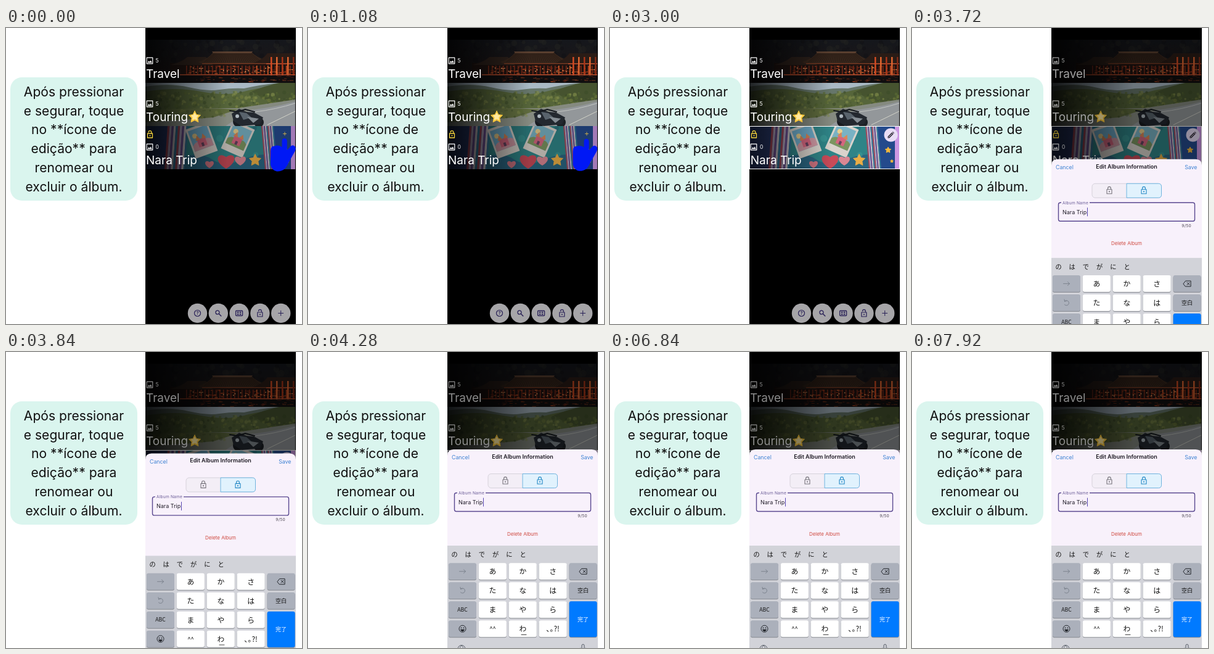
These frames come from a looping animation (480 px wide and 480 px high, 8000 ms). An HTML page:

```html
<!DOCTYPE html>
<html lang="pt">
<head>
<meta charset="utf-8">
<title>Editar álbum</title>
<style>
html, body { margin: 0; width: 100%; height: 100%; overflow: hidden; background: #fff; }
svg { display: block; width: 100vw; height: 100vh; }
text { font-family: Inter, 'Noto Sans CJK JP', 'Noto Sans CJK', sans-serif; }
.jp text { font-family: 'Noto Sans CJK JP', 'Noto Sans CJK', sans-serif; }
</style>
</head>
<body>
<svg id="stage" viewBox="0 0 480 480" xmlns="http://www.w3.org/2000/svg"></svg>
<script>
const LOOP = 8000;
const stage = document.getElementById('stage');

let seed = 7;
const rnd = () => (seed = (seed * 16807) % 2147483647) / 2147483647;
const pick = list => list[Math.floor(rnd() * list.length)];
const times = (n, fn) => Array.from({ length: n }, (_, i) => fn(i)).join('');

const rect = (x, y, w, h, fill, extra = '') =>
  `<rect x="${x}" y="${y}" width="${w}" height="${h}" fill="${fill}" ${extra}/>`;
const path = (d, fill, extra = '') => `<path d="${d}" fill="${fill}" ${extra}/>`;
const line = (d, color, width = 1, extra = '') =>
  path(d, 'none', `stroke="${color}" stroke-width="${width}" stroke-linecap="round" stroke-linejoin="round" ${extra}`);
const circle = (x, y, r, fill, extra = '') => `<circle cx="${x}" cy="${y}" r="${r}" fill="${fill}" ${extra}/>`;
const text = (s, x, y, size, fill, extra = '') =>
  `<text x="${x}" y="${y}" font-size="${size}" fill="${fill}" ${extra}>${s}</text>`;
const mid = 'text-anchor="middle"';
const at = (x, y, body, extra = '') => `<g transform="translate(${x} ${y}) ${extra}">${body}</g>`;

function star(x, y, r, fill, ratio = 0.5) {
  const pts = times(10, i => {
    const a = i * Math.PI / 5 - Math.PI / 2, q = i % 2 ? r * ratio : r;
    return `${(x + q * Math.cos(a)).toFixed(1)},${(y + q * Math.sin(a)).toFixed(1)} `;
  });
  return `<polygon points="${pts}" fill="${fill}" stroke="${fill}" stroke-width="1" stroke-linejoin="round"/>`;
}

const heart = (x, y, s, fill) =>
  at(x, y, path('M0 9C-17 -1-9-12 0-5C9-12 17-1 0 9Z', fill), `scale(${s})`);

// Icons are centred on their own origin.
const lock = (color, open, width = 1.1) =>
  line(`M-4-1.500H4V5.500H-4ZM-2.400-1.500V-3.500a2.400 2.400 0 0 1 4.800 0${open ? 'V-1.500' : 'V-1.500'}`, color, width,
    open ? 'stroke-dasharray="36.200 4 9"' : '') + circle(0, 2, 1.1, color);
const openLock = (color, width = 1.2) =>
  line('M-4-1.500H4V5.500H-4ZM-2.400-3.500a2.400 2.400 0 0 1 4.800 0V-1.500', color, width) + circle(0, 2, 1.1, color);
const imageIcon = line('M-4.800-4.800H4.800V4.800H-4.800Z', '#fff', 1.2) + path('M-3.6 3.2L-1.5.2 0 2 1.6-.6 3.8 3.2Z', '#fff');
const pencil = path('M-5 5V2.500L1.700-4.200 4.200-1.700-2.500 5ZM2.400-4.900L3.200-5.500 5.500-3.200 4.900-2.400Z', '#2c2733') +
  line('M-3.600 3.600L2-2', '#e9ddf6', 1);

function shrine() {
  const reds = ['#d04a22', '#a83518', '#7e2814', '#e0652f'];
  return rect(0, 0, 243, 70, 'url(#dusk)') +
    times(70, () => circle(rnd() * 243, rnd() * 34, 2 + rnd() * 4, pick(['#191b1c', '#222120', '#121316']), 'opacity=".6"')) +
    rect(40, 38, 203, 19, '#1f1310') +
    path('M40 41Q60 36 68 28H98L110 41Z', '#2d211b') +
    path('M86 36Q104 30 110 20H172Q180 28 196 34L190 39H90Z', '#37261c') +
    path('M108 19H174L172 22H110Z', '#5b4030') +
    path('M172 39Q190 33 198 22H243V40Z', '#2a1c16') +
    times(28, i => line(`M${112 + i * 2.2} 22L${96 + i * 3.4} 36`, '#231812', .7)) +
    rect(92, 38, 104, 1.4, '#7c3c24') + rect(196, 38, 47, 2, '#a5472a') +
    times(30, i => rect(66 + i * 6, 42, 1.5, 15, i > 18 ? pick(reds) : '#7a2a18')) +
    times(70, () => rect(66 + rnd() * 176, 42 + rnd() * 13, 2 + rnd() * 4, 1.2, pick(reds), 'opacity=".7"')) +
    times(24, () => circle(76 + rnd() * 165, 45 + rnd() * 8, .9, '#f0a468')) +
    times(5, i => rect(203 + i * 9, 28, 2.5, 40, pick(reds))) +
    rect(56, 56, 187, 1.6, '#b04a2a') +
    rect(0, 58, 243, 12, '#100e0f') +
    times(50, () => rect(80 + rnd() * 160, 59 + rnd() * 10, 2 + rnd() * 6, .9, pick(reds), 'opacity=".5"'));
}

function road() {
  const greens = ['#6f7a3c', '#3d4d2a', '#596a34', '#808a4a', '#4b5a30'];
  return rect(0, 0, 243, 70, '#a9b9c4') +
    path('M0 6Q40 0 70 7T120 11T160 9Q200 0 243-2V70H0Z', '#66766a') +
    path('M0 14Q50 6 90 14T160 14T243 2V70H0Z', '#56653a') +
    path('M172 14Q207-1 243-3V32L200 30Z', '#46532f') +
    times(230, () => {
      const x = rnd() * 243;
      return circle(x, 15 + rnd() * 28, .8 + rnd() * 2.4, pick(greens), 'opacity=".65"');
    }) +
    path('M0 50Q80 40 150 41L243 27V70H0Z', '#858a80') +
    path('M130 70L170 44Q214 39 243 30V70Z', '#93979a') +
    line('M178 47Q212 43 243 33', '#c3c6c2', 1) + line('M198 68L243 46', '#d2d2c8', 1) +
    path('M0 46Q70 39 150 43L110 56 0 64Z', '#5f6b3e') +
    times(60, () => circle(rnd() * 130, 44 + rnd() * 14, 1 + rnd() * 2, pick(greens), 'opacity=".5"')) +
    circle(150, 63, 8, '#181b20') + circle(184, 64, 8, '#1c2025') +
    path('M140 50L152 42 164 47 176 48 191 56 186 67 156 70 143 62Z', '#23282f') +
    path('M152 47L164 49 172 56 159 60Z', '#59636c') + path('M165 55L184 58 175 65Z', '#858d94') +
    line('M137 45L149 47 162 43 177 47', '#15191e', 2) + circle(149, 54, 3, '#aeb8be');
}

const polaroid = (x, y, turn, sky, hill) => at(x, y,
  rect(-19, -25, 38, 50, '#d9d3cc') + rect(-16, -21, 32, 35, sky) +
  circle(-8, -10, 4, '#e8cf8d') + path('M-16 14V5Q-8-4 0 4Q8-5 16 3V14Z', hill) +
  rect(-7, -3, 14, 13, '#d5667f') + path('M-9-2L-5-10-1-2ZM1-2L5-10 9-2Z', '#dc8655') + rect(-2, 4, 4, 6, '#65435f'),
  `rotate(${turn})`);

function pages(x, width, lean) {
  const colors = ['#a9485a', '#b9a9c4', '#6f4f93', '#d0c4cb', '#35779a'];
  const step = width / 10;
  return times(10, i => path(`M${x + i * step} 0h${step}l${lean} 70h${-step}Z`, colors[i % 5]));
}

function scrapbook() {
  return rect(0, 0, 243, 70, '#2b7f86') + rect(0, 0, 40, 70, '#2b3c70') +
    pages(36, 34, -5) +
    path('M70 0H190L198 70H64Z', '#2f8487') +
    path('M64 50Q88 41 108 54T153 56T198 46V70H64Z', '#2b6580') +
    times(14, () => circle(70 + rnd() * 118, rnd() * 68, 2 + rnd() * 4, pick(['#286b79', '#3b9794']), 'opacity=".7"')) +
    polaroid(91, 23, -20, '#6facca', '#cf98a3') + polaroid(150, 21, 24, '#79b2c4', '#7c9560') +
    heart(131, 57, 1.35, '#c84a58') + heart(154, 56, .9, '#d98793') + heart(104, 62, .7, '#cf7480') +
    star(178, 55.500, 10, '#e9ad45') +
    pages(188, 20, 6) +
    path('M208 0H237V70H214Z', '#244a8c') + rect(236, 0, 7, 70, '#cc97e3') +
    star(225, 39, 5, '#f5b93c') + star(231, 57, 2.500, '#f5b93c') +
    line('M226 10v5M223.500 12.500h5', '#f0d062', 1);
}

function album(y, name, count, picture, shade) {
  return at(226, y, `<g clip-path="url(#row)">${picture}${shade}</g>` +
    at(7, 34, imageIcon) + text(count, 16.5, 37.3, 8.5, '#fff') + text(name, 1, 62, 19, '#fff'));
}

const fade = rect(0, 0, 243, 70, 'url(#shade)');

function toolbar() {
  const ink = '#292157';
  const icons = [
    circle(0, 0, 5, 'none', `stroke="${ink}" stroke-width="1.2"`) + text('?', 0, 2.8, 7.600, ink, mid + ' font-weight="600"'),
    circle(-1.3, -1.3, 3, 'none', `stroke="${ink}" stroke-width="1.3"`) + line('M1 1L4.5 4.5', ink, 1.5),
    rect(-5.5, -4, 11, 8, 'none', `rx="1" stroke="${ink}" stroke-width="1.3"`) +
      times(4, i => rect(i % 2 ? .7 : -3.3, i > 1 ? .6 : -2.4, 2.6, 1.8, ink)),
    openLock(ink),
    line('M-4 0H4M0-4V4', ink, 1)
  ];
  return icons.map((icon, i) => at(310.5 + i * 33.8, 462.5, circle(0, 0, 15.7, '#a6a5a8') + icon)).join('');
}

function sheet() {
  const blue = '#3f83d3', violet = '#59478f';
  return path('M226 500V168Q226 158 236 158H460Q470 158 470 168V500Z', '#f8f1fb') +
    text('Cancel', 233, 174.2, 8.8, blue) + text('Save', 462.5, 174.2, 8.8, blue, 'text-anchor="end"') +
    text('Edit Album Information', 348, 172.8, 9, '#1d1a22', mid + ' font-weight="600"') +
    rect(292, 197.5, 112.5, 23, '#f3eef6', 'rx="5" stroke="#cfcbd3" stroke-width=".8"') +
    path('M348 197.5H399.500q5 0 5 5V215.500q0 5-5 5H348Z', '#e1f2fd', 'stroke="#62aedd" stroke-width=".9"') +
    at(320, 208.5, lock('#77747c')) + at(376, 208.5, lock('#2589c6')) +
    rect(237.500, 228.500, 221, 30, 'none', `rx="3" stroke="${violet}" stroke-width="1.4"`) +
    rect(242, 226, 46, 5, '#f8f1fb') + text('Album Name', 244, 231, 6.6, '#6a5b97', 'letter-spacing=".2"') +
    text('Nara Trip', 244, 246.8, 9, '#201c28') + rect(284, 236.500, 1, 14, '#5544b0') +
    text('9/50', 453, 267.800, 6.6, '#4c4753', 'text-anchor="end" letter-spacing=".3"') +
    text('Delete Album', 348, 297.700, 7.9, '#cf4a40', mid);
}

function keyboard() {
  const colX = i => 228 + i * 48.9, rowY = i => 342.3 + i * 31;
  const key = (c, r, fill, body, h = 27) =>
    rect(colX(c), rowY(r) + 1, 45, h, '#878a91', 'rx="3"') + rect(colX(c), rowY(r), 45, h, fill, 'rx="3"') +
    at(colX(c) + 22.500, rowY(r) + h / 2, body);
  const label = (s, size, fill = '#111') => text(s, 0, size * .37, size, fill, mid);
  const gray = '#abb0bb', ink = '#22252b';
  const left = [
    line('M-5 0H5M2-3L5 0 2 3', '#777d88', .9),
    line('M-3-2.500A4 4 0 1 1-3 3M-3-2.500L-3.500-5.500M-3-2.500L0-3', '#777d88', .9),
    label('ABC', 8.6),
    circle(0, 0, 5.5, 'none', `stroke="${ink}"`) + circle(-2, -1.5, .9, ink) + circle(2, -1.5, .9, ink) +
      path('M-3.500 1H3.500Q2 4.500 0 4.500T-3.500 1Z', ink)
  ];
  const kana = ['あ', 'か', 'さ', 'た', 'な', 'は', 'ま', 'や', 'ら', '^^', 'わ', '､｡?!'];
  const erase = line('M-6 0L-2.500-4.500H6V4.500H-2.500ZM0-2L4 2M4-2L0 2', ink, 1);
  return `<g class="jp">` + rect(226, 314, 244, 190, '#d2d3d9') +
    [...'のはでがにと'].map((k, i) => text(k, 237.500 + i * 22.2, 332, 10.2, '#111', mid)).join('') +
    left.map((body, r) => key(0, r, gray, body)).join('') +
    kana.map((k, i) => key(1 + i % 3, Math.floor(i / 3), '#fff', label(k, i === 9 ? 9.5 : 11.8))).join('') +
    line('M346 458.500H354', '#111', .8) +
    key(4, 0, gray, erase) + key(4, 1, gray, label('空白', 9)) + key(4, 2, '#007aff', label('完了', 9, '#fff'), 58) +
    at(249, 481.500, circle(0, 0, 6, 'none', 'stroke="#555b66"') + line('M-6 0H6M0-6Q-6 0 0 6Q6 0 0-6', '#555b66', .8)) +
    at(446, 480, rect(-2, -6, 4, 9, 'none', 'rx="2" stroke="#555b66"') + line('M-4 0Q-4 5 0 5T4 0M0 5V8', '#555b66')) + `</g>`;
}

const handShape = 'M447.500 183Q448 179 451.500 179T455.800 183V198L462 191.500Q465.500 189 468.500 192Q471 195 468.500 200' +
  'L459 217Q456 224 452 228.500Q446 233 439 232.500Q431 231 429 222V200Q429 191 435 191.500Q441 189 447.500 193Z';
const message = ['Após pressionar', 'e segurar, toque', 'no **ícone de', 'edição** para', 'renomear ou', 'excluir o álbum.'];
const plainScrapbook = scrapbook();

stage.innerHTML = `<defs>
  <clipPath id="phone"><rect x="226" width="244" height="480"/></clipPath>
  <clipPath id="row"><rect width="243" height="70"/></clipPath>
  <linearGradient id="shade"><stop stop-color="#000" stop-opacity=".82"/><stop offset=".55" stop-color="#000" stop-opacity="0"/></linearGradient>
  <linearGradient id="dusk" x2="0" y2="1"><stop stop-color="#15171c"/><stop offset="1" stop-color="#1d1413"/></linearGradient>
</defs>` +
  rect(0, 0, 480, 480, '#fff') + rect(7, 80, 206, 200, '#daf5ee', 'rx="19"') +
  message.map((s, i) => text(s, 110, 110.800 + i * 30.75, 21.1, '#101010', mid)).join('') +
  `<g clip-path="url(#phone)">` + rect(226, 0, 244, 480, '#000') +
  album(19, 'Travel', 5, shrine(), fade) +
  album(89, 'Touring', 5, road(), fade) + star(306, 144.500, 10, '#fbc83c') + star(306, 144, 6, '#ffe9a0') +
  album(159, 'Nara Trip', 0, plainScrapbook, rect(0, 0, 243, 70, '#000', 'opacity=".2"') + fade) +
  `<g id="selected">` +
  album(159, '', '', plainScrapbook, `<g opacity=".85">${fade}</g>`) +
  rect(226.5, 159.5, 243, 69, 'none', 'stroke="#fff"') +
  text('0', 243, 196.300, 8.500, '#fff') + text('Nara Trip', 227.800, 221, 19, '#fff') +
  at(455.500, 173.500, circle(0, 0, 11, '#e9ddf6') + pencil) + `</g>` +
  at(233.5, 172.500, openLock('#f3d33c', 1.3)) + toolbar() +
  `<rect id="dim" x="226" width="244" height="480"/>` +
  `<g id="sheet">${sheet()}</g><g id="keyboard">${keyboard()}</g></g>` +
  `<g id="hand">${path(handShape, '#0018f5')}</g>`;

const part = Object.fromEntries(['selected', 'dim', 'sheet', 'keyboard', 'hand'].map(id => [id, document.getElementById(id)]));
const progress = (t, start, length) => Math.min(1, Math.max(0, (t - start) / length));

function pressScale(p) {
  return p < .62 ? 1 + .22 * Math.sin(Math.PI * p / .62) : 1 - .04 * Math.sin(Math.PI * (p - .62) / .38);
}

function draw(t) {
  const left = 1 - progress(t, 3560, 450);
  const scale = pressScale(progress(t, 500, 820));
  part.hand.setAttribute('transform', `translate(449 206) scale(${scale}) translate(-449 -206)`);
  part.hand.setAttribute('opacity', 1 - progress(t, 1800, 640));
  part.selected.setAttribute('opacity', progress(t, 1320, 120));
  part.dim.setAttribute('opacity', .46 * progress(t, 3520, 250));
  part.sheet.setAttribute('transform', `translate(0 ${322 * left ** 4})`);
  part.keyboard.setAttribute('transform', `translate(0 ${168 * left ** 2.37})`);
}

const begin = performance.now();
function tick() {
  draw((performance.now() - begin) % LOOP);
  requestAnimationFrame(tick);
}
draw(0);
requestAnimationFrame(tick);
</script>
</body>
</html>
```
